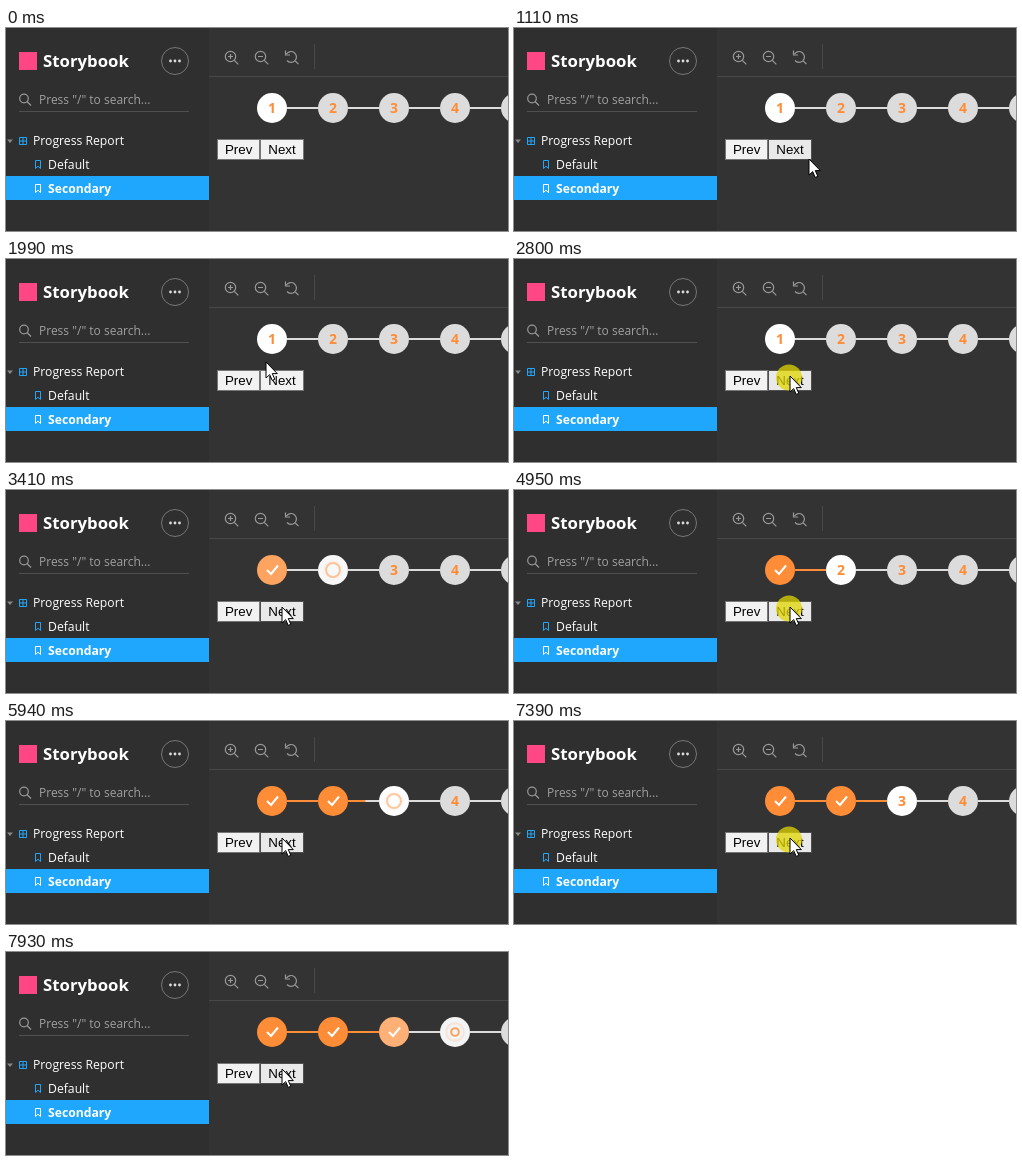
These frames come from a looping animation (502x203 px, 8000 ms). An HTML page:

```html
<!DOCTYPE html>
<html lang="en">
<head>
<meta charset="utf-8">
<title>Progress steps</title>
<style>
  html, body { margin: 0; width: 100%; height: 100%; overflow: hidden; background: #2f2f2f; }
  svg { display: block; }
  text { font: 12.2px "Open Sans", sans-serif; fill: #fff; }
  .brand { font-size: 16.8px; font-weight: 700; }
  .bold { font-weight: 700; }
  .hint { font-size: 12px; fill: #a0a0a0; }
  .icon { fill: none; stroke: #999; stroke-width: 1.2; }
  .blue { fill: none; stroke: #1ea7fd; }
  .num { font-size: 14px; font-weight: 700; fill: #ff8c37; text-anchor: middle; }
  .button text { font: 13.33px "Liberation Sans", Arial, sans-serif; fill: #000; text-anchor: middle; }
  .button rect { fill: #f2f2f2; stroke: #767676; }
  .button.hover rect { fill: #e9e9e9; stroke: #4f4f4f; }
</style>
</head>
<body>
<svg id="stage" width="502" height="203" viewBox="0 0 502 203">
  <rect width="502" height="203" fill="#2f2f2f"/>
  <rect x="203" width="299" height="203" fill="#333"/>
  <path d="M203 48.5H502M308.5 16V41" stroke="#484848"/>

  <rect x="13" y="24" width="18" height="18" fill="#ff4785"/>
  <text class="brand" x="37" y="39">Storybook</text>
  <circle cx="169" cy="33" r="13.5" fill="none" stroke="#777"/>
  <g fill="#ddd">
    <circle cx="164.5" cy="33" r="1.4"/><circle cx="169" cy="33" r="1.4"/><circle cx="173.5" cy="33" r="1.4"/>
  </g>

  <g class="icon">
    <circle cx="18" cy="70.5" r="4.3"/><path d="M21 73.500l4 4"/>
    <circle cx="224.500" cy="28.500" r="5.200"/><path d="M228.300 32.300l4 4M222 28.500h5M224.500 26v5"/>
    <circle cx="254.500" cy="28.500" r="5.200"/><path d="M258.300 32.300l4 4M252 28.500h5"/>
    <path d="M280.500 26A5.400 5.400 0 1 1 281 32.500M279.500 22.500V27H284M288.800 32.500l3.700 3.700"/>
  </g>
  <text class="hint" x="33" y="76">Press "/" to search...</text>
  <path d="M13 83.500H183" stroke="#505050"/>

  <path d="M1 111.500h6l-3 3.500z" fill="#888"/>
  <path class="blue" d="M13.500 109.500h7v7h-7zM17 109.500v7M13.500 113h7"/>
  <text x="27" y="117">Progress Report</text>
  <path class="blue" d="M29.500 132.500h5v8l-2.500-2.300l-2.500 2.300z"/>
  <text x="42" y="141">Default</text>
  <rect y="148" width="203" height="24" fill="#1ea7fd"/>
  <path d="M29.500 156.500h5v8l-2.500-2.300l-2.500 2.300z" fill="none" stroke="#fff"/>
  <text class="bold" x="42" y="165">Secondary</text>

  <g id="steps"></g>

  <g class="button"><rect x="211.500" y="111.500" width="42" height="20"/><text x="232.700" y="126">Prev</text></g>
  <g class="button" id="next"><rect x="254.500" y="111.500" width="43" height="20"/><text x="276" y="126">Next</text></g>

  <circle id="press" cx="275" cy="118.500" r="13" fill="#e0d400" opacity=".75"/>
  <path id="cursor" d="M0 0V16L3.700 12.600L6.200 18.400L8.800 17.300L6.300 11.600H11.300Z" fill="#fff" stroke="#000"/>
</svg>
<script>
const LOOP = 8000, PRESS = 100, FADE = 640, GAP = 61, FIRST_X = 266, Y = 80, R = 15;
const WHITE = [255, 255, 255], GREY = [220, 220, 220], ORANGE = [255, 140, 55];
const clicks = [
  { at: 2800, phase: 30, load: 1500 },
  { at: 4950, phase: -350, load: 1550 },
  { at: 7390, phase: -230, load: 1550 }
];
// time, x, y of the pointer tip
const track = [
  [760, 376, 203], [1110, 295, 131], [1340, 238, 104],
  [1860, 238, 104], [1990, 260, 103], [2520, 276, 117]
];

const $ = id => document.getElementById(id);
const clamp = v => Math.min(1, Math.max(0, v));
const lerp = (a, b, p) => a + (b - a) * p;
const mix = (a, b, p) => `rgb(${a.map((v, i) => Math.round(lerp(v, b[i], p)))})`;
const show = (el, on) => el.setAttribute("visibility", on ? "visible" : "hidden");

function add(parent, tag, attrs) {
  const el = document.createElementNS("http://www.w3.org/2000/svg", tag);
  for (const key in attrs) el.setAttribute(key, attrs[key]);
  return parent.appendChild(el);
}

const steps = Array.from({ length: 5 }, (_, i) => {
  const x = FIRST_X + GAP * i, root = $("steps");
  const line = stroke => add(root, "path", { d: `M${x + R} ${Y}h${GAP - 2 * R}`, stroke, "stroke-width": 2 });
  line("#dcdcdc");
  const bar = line("#ff8c37");
  const disc = add(root, "circle", { cx: x, cy: Y, r: R });
  const num = add(root, "text", { class: "num", x, y: Y + 5 });
  num.textContent = i + 1;
  const check = add(root, "path", { d: `M${x - 5} ${Y}l4 4l7-8.500`, fill: "none", stroke: "#fff", "stroke-width": 2 });
  const rings = [0, 1].map(() =>
    add(root, "circle", { cx: x, cy: Y, fill: "none", stroke: "#ff8c37", "stroke-width": 2 }));
  return { x, bar, disc, num, check, rings };
});

function drawStep(step, i, t) {
  const age = click => click ? t - click.at - PRESS : -Infinity;
  const loader = clicks[i - 1];
  const done = age(clicks[i]), active = age(loader);
  const loading = active >= 0 && active < loader.load;

  step.disc.setAttribute("fill", done >= 0
    ? mix(WHITE, ORANGE, clamp(done / FADE))
    : mix(GREY, WHITE, i ? clamp(active / FADE) : 1));
  show(step.check, done >= 0);
  show(step.num, done < 0 && !loading);

  const filled = clamp((done - 665) / 400);
  show(step.bar, filled > 0);
  step.bar.setAttribute("d", `M${step.x + R} ${Y}h${(GAP - 2 * R) * filled}`);

  step.rings.forEach((ring, k) => {
    show(ring, loading);
    if (!loading) return;
    const p = (active + loader.phase + 1800 + 900 * k) % 1800 / 1800;
    ring.setAttribute("r", 0.5 + 8.5 * (1 - (1 - p) ** 4));
    ring.setAttribute("opacity", (1 - p) ** 2);
  });
}

function drawPointer(t) {
  const k = track.findIndex(key => key[0] > t);
  const to = k < 0 ? track[track.length - 1] : track[k];
  const from = k < 1 ? to : track[k - 1];
  let p = from === to ? 1 : (t - from[0]) / (to[0] - from[0]);
  if (k === track.length - 1) p = 1 - (1 - p) ** 2;
  const x = lerp(from[1], to[1], p), y = lerp(from[2], to[2], p);
  $("cursor").setAttribute("transform", `translate(${x} ${y})`);
  show($("cursor"), t >= track[0][0]);
  $("next").classList.toggle("hover", x >= 254 && x < 298 && y >= 111 && y < 132);
  show($("press"), clicks.some(c => t >= c.at && t < c.at + PRESS));
}

let start;
function frame(now) {
  start ??= now;
  const t = (now - start) % LOOP;
  steps.forEach((step, i) => drawStep(step, i, t));
  drawPointer(t);
  requestAnimationFrame(frame);
}
requestAnimationFrame(frame);
</script>
</body>
</html>
```
